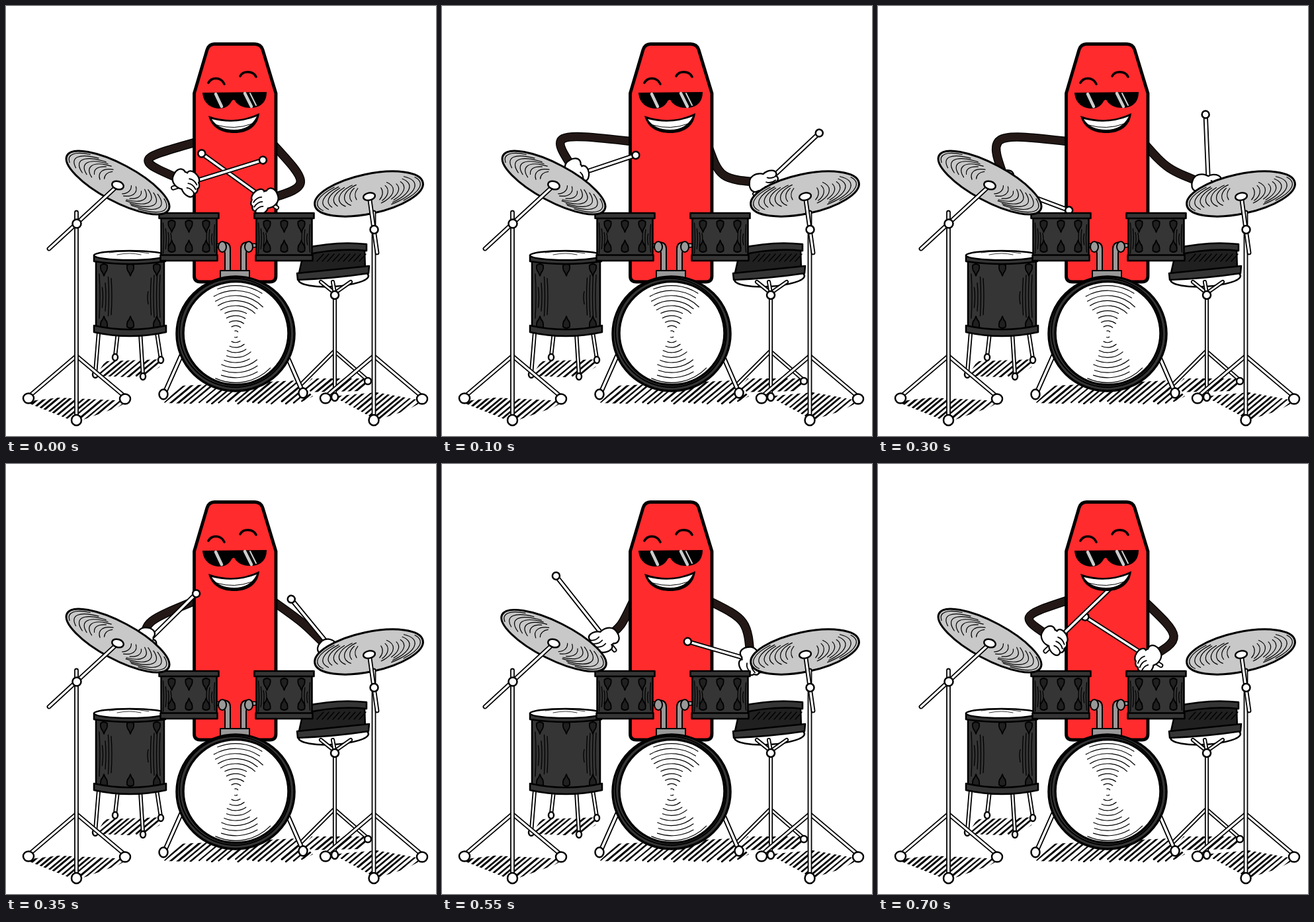
These frames come from a looping animation (650 px wide and 650 px high, 750 ms). An HTML page with a canvas:

```html
<!DOCTYPE html>
<html lang="en">
<head>
<meta charset="utf-8">
<title>Drummer</title>
<style>
html, body { margin: 0; width: 100%; height: 100%; overflow: hidden; background: #fff; }
canvas { display: block; }
</style>
</head>
<body>
<canvas id="stage" width="650" height="650"></canvas>
<script>
const ctx = document.getElementById("stage").getContext("2d");
const STEP = 50, STEPS = 15;
const INK = "#000", DRUM = "#353535", DARK = "#202020", SLEEVE = "#231815", METAL = "#999";

// Key poses: hand place, stick direction in degrees, visible stick length, elbow
const pose = (at, x, y, aim, reach, elbowX, elbowY) => ({ at, x, y, aim, reach, elbowX, elbowY });
const leftArm = [
  pose(0, 273, 266, -16, 120, 193, 232),
  pose(2, 203, 253, -17, 94, 162, 191),
  pose(4, 203, 268, 21, 101, 177, 190),
  pose(6, 195, 271, 22, 101, 165, 191),
  pose(9, 231, 267, -142, 117, 280, 308),
  pose(12, 250, 265, -122, 122, 268, 225)
];
const rightArm = [
  pose(0, 390, 294, 217, 118, 462, 272),
  pose(2, 487, 267, 318, 112, 420, 262),
  pose(4, 483, 262, 360, 77, 420, 252),
  pose(6, 497, 270, 269, 106, 437, 247),
  pose(9, 487, 304, 176, 92, 468, 228),
  pose(12, 460, 297, 205, 103, 460, 238)
];

function poseAt(keys, step) {
  const a = keys.findLast(key => key.at <= step);
  const b = keys.find(key => key.at > step) || { ...keys[0], at: STEPS };
  const k = 1 - (1 - (step - a.at) / (b.at - a.at)) ** 1.25;
  const mixed = {};
  for (const name in a) mixed[name] = a[name] + (b[name] - a[name]) * k;
  return mixed;
}
// Recoil after a beat: full at once, half a step later, then gone
const recoil = age => age < 0 ? 0 : Math.max(0, 1 - age / 2);

function randomFrom(seed) {
  return () => (seed = (seed * 16807) % 2147483647) / 2147483647;
}
function paint(path, fill, stroke, width = 2) {
  const p = path instanceof Path2D ? path : new Path2D(path);
  if (fill) { ctx.fillStyle = fill; ctx.fill(p); }
  if (stroke) { ctx.strokeStyle = stroke; ctx.lineWidth = width; ctx.stroke(p); }
}
function oval(x, y, rx, ry = rx, turn = 0, from = 0, to = 2 * Math.PI) {
  const p = new Path2D();
  p.ellipse(x, y, rx, ry, turn, from, to);
  return p;
}
function rod(x1, y1, x2, y2, width = 3.2) {
  const line = `M${x1},${y1}L${x2},${y2}`;
  paint(line, null, INK, width + 3.6);
  paint(line, null, "#fff", width);
}
function knob(x, y, rx, ry = rx, turn = 0) {
  paint(oval(x, y, rx, ry, turn), "#fff", INK, 2.5);
}
function placed(x, y, turn, draw, scaleX = 1, scaleY = 1) {
  ctx.save();
  ctx.translate(x, y);
  ctx.rotate(turn);
  ctx.scale(scaleX, scaleY);
  draw();
  ctx.restore();
}

function hatch(area, from, to, top, bottom) {
  const random = randomFrom(from);
  const run = (bottom - top) * 1.2;
  ctx.save();
  ctx.clip(new Path2D(area));
  for (let x = from - run; x < to; x += 8 + 4 * random()) {
    const trim = .16 * random();
    paint(`M${x + run * trim},${bottom - (bottom - top) * trim}L${x + run},${top}`, null, INK, 2.2 + random());
  }
  ctx.restore();
}
function shadows() {
  hatch("M28,598L80,592L186,597L168,607L112,627L98,626Z", 28, 186, 590, 628);
  hatch("M136,559L150,537L236,534L232,546L205,562Z", 136, 236, 534, 563);
  hatch("M238,600L265,574L440,566L464,590L438,603L300,602Z", 238, 464, 566, 603);
  hatch("M444,584L462,563L550,563L538,582Z", 444, 550, 562, 585);
  hatch("M494,590L560,584L632,597L604,612L560,626L535,612Z", 494, 632, 584, 627);
}

function body() {
  paint("M284.5,132L304,66Q307,57.5 315,57.5H376Q385,57.5 388,66L408,132V408Q408,417 399,417H294Q284.5,417 284.5,408Z", "#ff2b2d", INK, 4.8);
}
function face() {
  paint("M306,116C311,107 325,107 330,118", null, INK, 3.6);
  paint("M354,106C358,98 373,97 378,107", null, INK, 3.6);
  paint("M297,131L394,130C394,146 384,154 369,154C357,154 349,149 346,143Q344,140 341,144C337,152 330,155 322,155C306,154 298,144 297,131Z", INK);
  paint("M317,133L326,152M361,132L371,152", null, "#ccc", 4.5);
  paint("M369,132L378,150", null, "#ccc", 2);
  paint("M306,166Q346,180 383,162C381,182 366,192 345,192C325,192 311,184 306,166Z", INK);
  paint("M311,171Q346,180 379,167Q369,187 345,187Q321,187 311,171Z", "#fff");
  paint("M319,180Q345,188 372,178", null, INK, 1);
}

function sleeve({ x, y, elbowX, elbowY }, shoulderX) {
  const elbow = `${elbowX},${elbowY}`;
  const line = `M${shoulderX},205C${elbow} ${elbow} ${x},${y}`;
  paint(line, null, INK, 13.5);
  paint(line, null, SLEEVE, 11);
}
function hand({ x, y, aim, reach, elbowX, elbowY }, side) {
  placed(x, y, aim * Math.PI / 180, () => {
    rod(-22, 3, reach, 0, 3.6);
    knob(reach, 0, 5.5);
  });
  placed(x, y, Math.atan2(y - elbowY, x - elbowX), () => {
    const parts = [oval(-6, 0, 15, 12), oval(-13, -3, 8, 11)];
    for (let i = 0; i < 4; i++)
      parts.push(oval(11 - 3 * Math.abs(i - 1.5), -10 + 7 * i, 10.5, 6, .45));
    parts.forEach(part => paint(part, null, INK, 4.5));
    parts.forEach(part => paint(part, "#fff"));
    for (let i = 0; i < 3; i++)
      paint(`M${2 + i},${-6 + 7 * i}q7,-2 14,4`, null, INK, 1.8);
  }, 1, side);
}

function lugs(center, spacing, top, bottom) {
  const drop = "M-5,-7Q0,-11 5,-7Q6,0 2,4L0,9L-2,4Q-6,0 -5,-7Z";
  for (const [y, flip] of [[top, 1], [bottom, -1]])
    for (const i of [-1, 0, 1])
      placed(center + i * spacing, y, 0, () => paint(drop, DARK, INK, 1.8), 1, flip);
}
// Ink lines that shorten away from both sides of a drum
function shading(center, half, top, bottom, count, gap) {
  const random = randomFrom(half);
  for (let i = 0; i < count; i++)
    for (const side of [-1, 1]) {
      const x = center + side * (half - i * gap);
      const cut = (bottom - top) * .4 * random();
      paint(`M${x},${top + cut}Q${x - side * 2},${(top + bottom) / 2} ${x},${bottom - cut * .8}`, null, INK, 1.3);
    }
}
function tom(center, hit) {
  placed(center, 0, 0, () => {
    paint("M-42,320H42V378H-42Z", DRUM, INK, 2.5);
    shading(0, 39, 328, 374, 4, 3.8);
    lugs(0, 26, 333, 363);
    paint("M-45,313H45V321H-45Z", DRUM, INK, 2.5);
    paint("M-43,376.5H43V385H-43Z", DRUM, INK, 2.5);
  }, 1 + .075 * hit);
}
function bracket() {
  for (const side of [-1, 1])
    placed(347, 0, 0, () => {
      paint("M29,362H18", null, INK, 7);
      paint("M29,362H18", null, METAL, 4);
      paint("M8,400V367Q8,357 19,357L23,368Q16,368 16,374V400Z", METAL, INK);
      paint(oval(20, 364, 6, 8), METAL, INK);
    }, side);
  paint("M324,400H368V413H324Z", METAL, INK);
}

function bassDrum() {
  rod(265, 528, 241, 582, 3.6);
  rod(427, 534, 447, 580, 3.6);
  knob(238, 587, 6.5, 7.5);
  knob(449, 585, 6.5, 7.5);
  paint(oval(347, 495.5, 89, 86.5), DRUM, INK, 3.5);
  paint(oval(346, 494, 84, 82, .3), null, INK);
  paint(oval(347.5, 494.5, 79.5, 78), "#fff", INK, 3.5);
  const random = randomFrom(7);
  for (let r = 5; r < 74; r += 7.6)
    for (const middle of [-1.45, 1.45]) {
      const from = middle - .35 - .35 * random(), to = middle + .35 + .35 * random();
      paint(oval(347, 496, r, r, 0, from, to), null, INK, 1.2);
    }
}
function floorTom() {
  const feet = [[140, 135, 557], [169, 165, 531], [203, 207, 560], [228, 234, 535]];
  for (const [top, x, y] of feet) {
    rod(top, 494, x, y - 2, 2.6);
    knob(x, y, 4, 5);
  }
  paint("M136,382V488Q187,500 239,488V382Z", DRUM, INK, 2.5);
  shading(187, 46, 405, 472, 5, 4.5);
  lugs(188, 40, 399, 478);
  paint("M133,377V386Q187,394 241,386V377Z", DRUM, INK, 2.5);
  paint(oval(187, 377, 54, 7), "#fff", INK, 2.5);
  paint("M156,373Q185,368 216,374M168,376Q187,372 204,376", null, INK, .8);
  paint("M133,483Q187,495 242,483V493Q187,505 133,493Z", DRUM, INK, 2.5);
}
function sideDrum() {
  rod(495, 523, 447, 571, 2.6);
  rod(499, 524, 545, 564, 2.6);
  rod(497, 438, 497, 585, 2.6);
  knob(547, 567, 5);
  knob(497, 591, 5, 6);
  paint(oval(495, 411, 53, 13, -.06), "#fff", INK, 2.5);
  for (const x of [476, 494, 521]) rod(497, 434, x, 417, 2.6);
  knob(497, 437, 6);
  paint("M450,372L542,367L543,399L442,408Z", DARK, INK, 2.5);
  for (let x = 470; x < 540; x += 8)
    paint(`M${x},386l10,-11`, null, INK, 1.4);
  paint("M452,366Q500,355 545,360V370Q500,365 450,377Z", DRUM, INK, 2.5);
  paint("M440,404L549,393L548,404Q495,412 441,414Z", DRUM, INK, 2.5);
}

function tripod(x, left, right) {
  rod(x, 529, left, 589);
  rod(x, 529, right, 589);
  rod(x, 312, x, 620);
  knob(left - 2, 593, 8, 7.5);
  knob(right + 2, 594, 8, 7.5);
  knob(x, 626, 7.5, 8);
}
function cymbal(x, y, rx, ry, turn) {
  const random = randomFrom(x | 0);
  placed(x, y, turn, () => {
    paint(oval(0, 0, rx, ry), "#c8c8c8", INK, 3);
    for (let k = .25; k < .95; k += .1)
      for (const middle of [Math.PI + .25, .25]) {
        const spread = .55 + .35 * random();
        paint(oval(0, 0, rx * k, ry * (.42 + .48 * k), 0, middle - spread, middle + spread), null, INK, 1.2);
      }
  });
}
function leftStand(hit) {
  cymbal(169, 267, 87 + hit, 28, .49 - .05 * hit);
  tripod(106.5, 36, 178);
  rod(65, 367, 166, 274);
  knob(169, 271, 9, 6, .3);
  knob(107, 329, 6.5);
}
function rightStand(hit) {
  cymbal(548.5 - hit, 284, 83.5 + hit, 30 - 2.5 * hit, -.21 + .07 * hit);
  tripod(556, 485, 627);
  rod(549.5, 290, 556, 337);
  rod(556, 338, 561, 373);
  knob(549, 288, 9, 5.5, -.2);
  knob(556.5, 338, 6);
}

function draw(step) {
  const left = poseAt(leftArm, step), right = poseAt(rightArm, step);
  ctx.fillStyle = "#fff";
  ctx.fillRect(0, 0, 650, 650);
  shadows();
  sleeve(left, 290);
  sleeve(right, 400);
  body();
  hand(right, -1);
  hand(left, 1);
  face();
  floorTom();
  sideDrum();
  bracket();
  tom(276.5, recoil(step - 4));
  tom(420.5, recoil(step - 9));
  bassDrum();
  leftStand(recoil(step - 10));
  rightStand(recoil(step - 4));
}

ctx.lineCap = ctx.lineJoin = "round";
let shown = -1;
function tick() {
  const step = Math.floor(performance.now() / STEP) % STEPS;
  if (step !== shown) draw(shown = step);
  requestAnimationFrame(tick);
}
tick();
</script>
</body>
</html>
```
